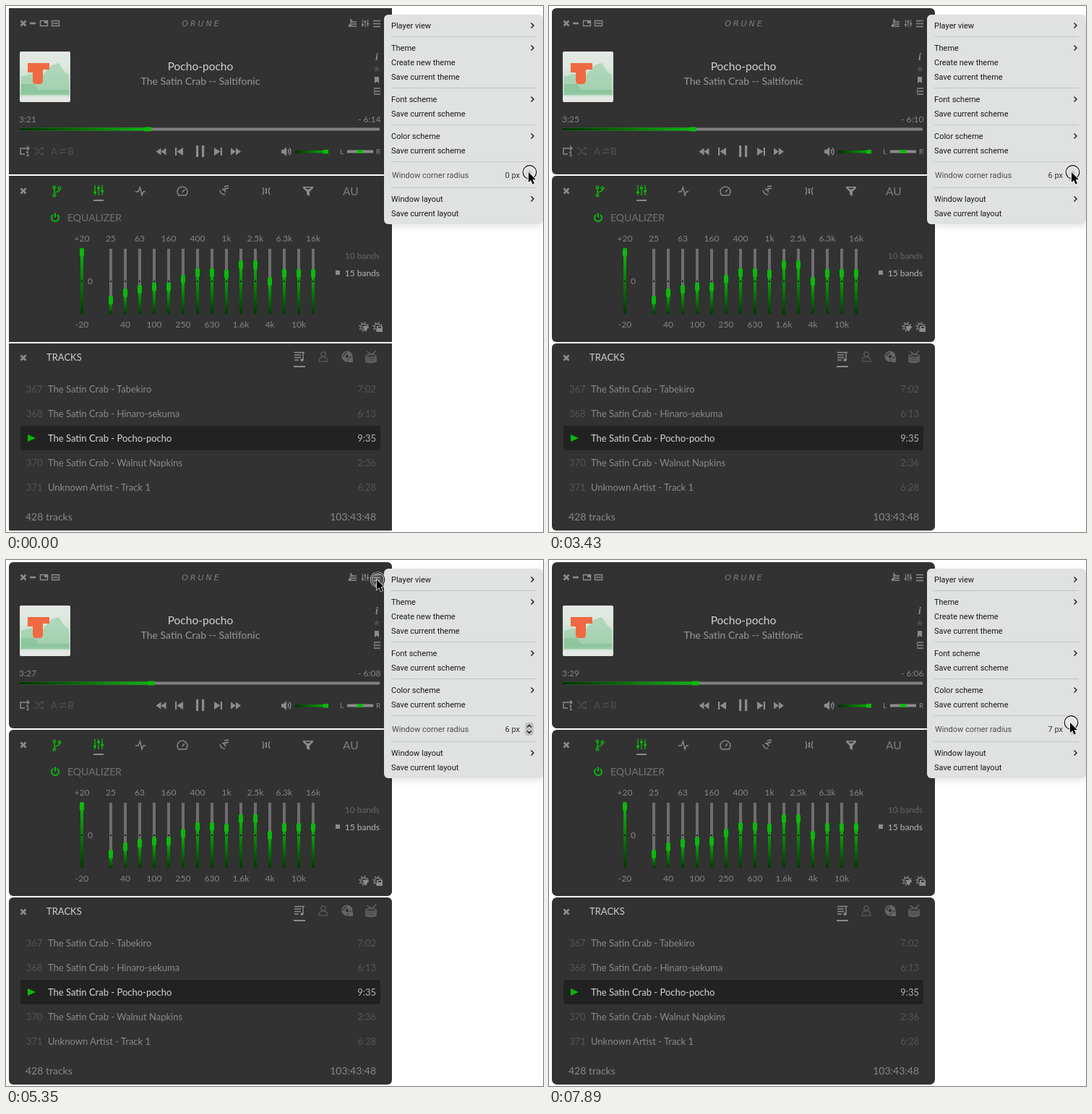
Recreate the animation shown at these times as an HTML page. Size 743 by 728 pixels, loop 8000 ms.

```html
<!DOCTYPE html>
<html lang="en">
<head>
<meta charset="utf-8">
<title>Music player</title>
<style>
html, body { margin: 0; width: 100%; height: 100%; overflow: hidden; background: #fff; }
svg { display: block; }
text { font: 12px Lato, sans-serif; fill: currentColor; }
path, circle, rect { fill: currentColor; }
.line, .line * { fill: none; stroke: currentColor; stroke-width: 1.4; }
.thick { stroke-width: 2.6; }
.mid { text-anchor: middle; }
.end { text-anchor: end; }
.icon { color: #8c8c8c; }
.dim { color: #4b4b4b; }
.green { color: #0bb80b; }
.big { font-size: 14px; }
.row { font-size: 13px; }
#menu { color: #161616; }
#menu text { font: 11px Roboto, sans-serif; }
#menu .card { fill: #e0e2e1; filter: drop-shadow(0 3px 5px rgba(0,0,0,.1)); }
</style>
</head>
<body>
<svg width="743" height="728" viewBox="0 0 743 728">
  <defs>
    <linearGradient id="across"><stop stop-color="#013001"/><stop offset="1" stop-color="#0bb80b"/></linearGradient>
    <linearGradient id="down" x2="0" y2="1"><stop stop-color="#0bb80b"/><stop offset="1" stop-color="#023a02"/></linearGradient>
    <linearGradient id="cover" x2="0" y2="1"><stop stop-color="#e4e8e4"/><stop offset=".3" stop-color="#dce8de"/><stop offset=".85" stop-color="#b5d8bd"/><stop offset=".9" stop-color="#e3e8e4"/></linearGradient>
    <path id="close" class="line thick" d="M20.500 20.500l7 7m0-7l-7 7"/>
    <g id="sliders" class="line"><path d="M-5-7V7M0-7V7M5-7V7"/><path class="thick" d="M-7 3h4M-2-3h4M3 1h4"/></g>
  </defs>

  <g color="#323232">
    <rect class="panel" x="4" y="3" width="530" height="230"/>
    <rect class="panel" x="4" y="235" width="530" height="230"/>
    <rect class="panel" x="4" y="467" width="530" height="259"/>
  </g>

  <!-- Player -->
  <g class="icon">
    <use href="#close"/>
    <path class="line thick" d="M33 24h8"/>
    <path class="line" d="M47.500 20.500h10v7h-10zM63.500 20.500h10v7h-10zM65 24h7"/>
    <path d="M53 20h5v4h-5z"/>
    <path class="line" d="M478 22h7M478 25h7M474 28h11M477 27v-8l2 2"/>
    <circle cx="475.500" cy="27" r="1.700"/>
    <path class="line" d="M508 20.500h10M508 24.500h10M508 28.500h10"/>
    <use href="#sliders" transform="translate(497 24) scale(.72)"/>
    <text x="513" y="75" class="mid" style="font:italic bold 14px 'Liberation Serif',serif">i</text>
    <path d="M510 98h6v9l-3-2.500-3 2.500z"/>
    <path class="line" d="M509 114h9M512 118h6M509 122h9M509 116l2 2-2 2"/>
    <path class="line" d="M20 201v-4h11M26 205h-6v-4M29 194l3 3-3 3"/>
    <text x="27" y="208" style="font-size:10px;font-weight:bold">1</text>
    <path d="M214.500 196.500v10l-7-5zM221.500 196.500v10l-7-5zM245 196v11l-8.500-5.500zM234 196h2.200v11H234zM263 193h3.200v16H263zM271 193h3.200v16H271zM288 196v11l8.500-5.500zM296.800 196h2.200v11h-2.200zM311 196.500v10l7-5zM318 196.500v10l7-5z"/>
    <path d="M381 199h3l4-4v13l-4-4h-3z"/>
    <path class="line" d="M390 198.500q2 3 0 6M392 196.500q4 5 0 10"/>
    <path d="M472 199.500h36v4h-36z"/>
    <text x="462" y="205" style="font-size:10px">L</text>
    <text x="512" y="205" style="font-size:10px">R</text>
  </g>
  <g class="dim">
    <path d="M513 82l1.300 3.300 3.700.2-2.800 2.300.9 3.600-3.100-2-3.100 2 .9-3.600-2.800-2.300 3.700-.2z"/>
    <path class="line" d="M39 197h3l6 8h4M39 205h3l6-8h4M50 195l2 2-2 2M50 203l2 2-2 2M74 199h8l-2-2M83 203h-8l2 2"/>
    <text x="62" y="206" class="row" style="font-weight:bold">A</text>
    <text x="85" y="206" class="row" style="font-weight:bold">B</text>
  </g>
  <text x="270.500" y="28" class="mid" color="#808080" style="font:italic 11px 'DejaVu Sans',sans-serif;letter-spacing:3px">ORUNE</text>
  <rect x="19" y="63" width="70" height="70" rx="2" style="fill:url(#cover)"/>
  <path d="M21 98l14-4 12 6 16-18 10-3 8 12 6 5v24H21z" color="#94cca3" opacity=".6"/>
  <path d="M21 108h18l6 8h42v7H21z" color="#7fbf92" opacity=".6"/>
  <path d="M30 79h30v9h-9v15q0 5-5 5h-5q-4 0-4-5V92h-7z" color="#ef6a42"/>
  <text x="269" y="89" class="mid" color="#d2d2d2" style="font-size:15.500px">Pocho-pocho</text>
  <text x="269" y="109" class="mid big" color="#999">The Satin Crab -- Saltifonic</text>
  <text id="elapsed" x="18" y="161" color="#888"></text>
  <text id="remaining" x="518.500" y="161" class="end" color="#888"></text>
  <rect x="19" y="168.500" width="498" height="4" color="#808080"/>
  <rect id="played" x="19" y="168.500" height="4" style="fill:url(#across)"/>
  <rect id="knob" class="green" y="167.500" width="10" height="6" rx="1"/>
  <rect x="400" y="200" width="46" height="3.500" style="fill:url(#across)"/>
  <path class="green" d="M439 199h7v5.500h-7zM486 199h8v5h-8z"/>

  <!-- Effects -->
  <g class="icon">
    <use href="#close" y="232"/>
    <path d="M121 268h14v2h-14z"/>
    <path class="line" d="M179 257h4l2.500-6 2.500 11 2-5h3M239 262a7 7 0 1 1 10 0zM244 258l3-4M296 255q1 6 7 6M299 253q6 3 4 5M301 255l3-3M302 250q4-1 6-1M304 254q1-2 4-2M355 251q3 5 0 10M359 252.500q2 3.500 0 7M361 252.500q-2 3.500 0 7M365 251q-3 5 0 10"/>
    <path d="M411 250h14v2l-5 5v6l-4-2v-4l-5-5z"/>
    <path d="M414 251.500h8l-2 2h-4z" color="#323232"/>
    <text x="466" y="262" color="#7d7d7d" style="font-size:15.500px">AU</text>
    <path d="M456 366h6v6h-6z"/>
  </g>
  <g class="green">
    <use href="#sliders" transform="translate(128 255)"/>
    <g class="line"><circle cx="67" cy="251" r="1.800"/><circle cx="74" cy="252" r="1.800"/><circle cx="67" cy="262" r="1.800"/><path d="M67 253v7M74 254q0 3-7 4"/></g>
    <path class="line" d="M65 289a5 5 0 1 0 6 0M68 286.500v6" style="stroke-width:2"/>
  </g>
  <text x="85" y="298" class="big" color="#737373">EQUALIZER</text>
  <g id="bands" color="#858585"><text x="113" y="385">0</text></g>
  <text x="517" y="350" class="end" color="#666">10 bands</text>
  <text x="517" y="374" class="end" color="#b4b4b4">15 bands</text>
  <g class="icon">
    <g class="line"><circle cx="495" cy="444" r="4"/><circle cx="514" cy="444" r="4"/></g>
    <g class="line" stroke-dasharray="2 2.700"><circle cx="495" cy="444" r="6"/><circle cx="514" cy="444" r="6"/></g>
    <path d="M493 443h9l-4.500 8zM513 443h8v8h-8z"/>
    <path d="M515 444h4v2h-4z" color="#323232"/>
  </g>

  <!-- Playlist -->
  <g class="icon">
    <use href="#close" y="463"/>
    <path class="line" d="M399 479.500h14M399 483h9M399 486.500h9M399 490h6M411 490v-11"/>
    <circle cx="409.500" cy="490" r="2"/>
    <path d="M398 498h16v2h-16z"/>
  </g>
  <g color="#666">
    <g class="line" color="#555"><circle cx="439" cy="482" r="3.200"/><path d="M433 492q0-5 4-6h4q4 1 4 6z"/></g>
    <circle cx="472" cy="485" r="7.500"/>
    <circle cx="472" cy="485" r="2.300" color="#323232"/>
    <path class="line" d="M467 485a5 5 0 0 1 5-5M477 485a5 5 0 0 1-5 5" color="#323232"/>
    <path d="M474 488l6-1v6h-6z"/>
    <path d="M498 485h14v7q-7 3-14 0z" color="#555"/>
    <path class="line" d="M498 484q7-4 14 0v8q-7 3-14 0zM499 478l7 4M512 477l-6 6"/>
  </g>
  <text x="56" y="491" class="row" color="#d0d0d0">TRACKS</text>
  <rect x="20" y="581" width="498" height="34" rx="3" color="#222"/>
  <path class="green" d="M30 593l11 5-11 5z"/>
  <g id="tracks"></g>
  <text x="27" y="712" class="big" color="#888">428 tracks</text>
  <text x="512" y="712" class="big end" color="#888">103:43:48</text>

  <!-- Menu -->
  <g id="menu">
    <rect class="card" x="523" y="12" width="220" height="290" rx="6"/>
    <path d="M533 42h200v1H533zM533 113h200v1H533zM533 164h200v1H533zM533 215h200v1H533zM533 251h200v1H533z" color="#c2c4c3"/>
    <text x="534" y="238" color="#4a4a4a">Window corner radius</text>
    <text id="radius" x="711" y="238" class="end" color="#333"></text>
    <g id="stepper">
      <rect x="718" y="225" width="12" height="18" rx="4" color="#bfc1c0"/>
      <path class="line" d="M721 231.500l3-3 3 3M721 236.500l3 3 3-3"/>
    </g>
  </g>

  <g id="pointer">
    <g id="ring"><circle cx="1.500" r="9.300" style="fill:rgba(255,255,255,.15);stroke:#fff;stroke-width:2.600"/><circle cx="1.500" r="9.300" style="fill:none;stroke:#000;stroke-width:1.200"/></g>
    <path d="M0 0v14l3.200-3 2.400 5.400 2.300-1-2.300-5.200H10z" style="fill:#000;stroke:#fff;stroke-width:1.400;paint-order:stroke"/>
  </g>
</svg>

<script>
const LOOP = 8000, STEP = 148.8, TRACK_LENGTH = 575;
const $ = id => document.getElementById(id);
const add = (id, markup) => $(id).insertAdjacentHTML('beforeend', markup);
const clock = s => `${Math.floor(s / 60)}:${String(s % 60).padStart(2, '0')}`;

function addSlider(x, y) {
  add('bands', `<rect x="${x - 2}" y="336" width="4" height="90" color="#6e6e6e"/>
    <rect x="${x - 2}" y="${y}" width="4" height="${426 - y}" style="fill:url(#down)"/>
    <rect x="${x - 1}" y="380" width="2" height="2" color="#151515"/>
    <rect class="green" x="${x - 3}" y="${y - 6}" width="6" height="12" rx="2"/>`);
}
const addLabel = (x, y, label) => add('bands', `<text class="mid" x="${x}" y="${y}">${label}</text>`);

addSlider(105, 341);
[407, 397, 392, 389, 389, 378, 369, 369, 371, 358, 358, 381, 370, 370, 370]
  .forEach((y, i) => addSlider(145 + 20 * i, y));
addLabel(105, 326, '+20');
addLabel(105, 445, '-20');
'25 40 63 100 160 250 400 630 1k 1.6k 2.5k 4k 6.3k 10k 16k'.split(' ')
  .forEach((label, i) => addLabel(145 + 20 * i, i % 2 ? 445 : 326, label));

const BAND = 'The Satin Crab - ';
[[BAND + 'Tabekiro', '7:02'], [BAND + 'Hinaro-sekuma', '6:13'], [BAND + 'Pocho-pocho', '9:35'],
 [BAND + 'Walnut Napkins', '2:36'], ['Unknown Artist - Track 1', '6:28']].forEach(([name, length], i) => {
  const y = 535 + 34 * i, playing = i === 2;
  if (!playing) add('tracks', `<text class="row" x="28" y="${y}" color="#555">${367 + i}</text>`);
  add('tracks', `<text class="row" x="58" y="${y}" color="${playing ? '#d6d6d6' : '#8a8a8a'}">${name}</text>
    <text class="row end" x="512" y="${y}" color="${playing ? '#b4b4b4' : '#555'}">${length}</text>`);
});

[[27, 'Player view', 1], [58, 'Theme', 1], [78, 'Create new theme'], [98, 'Save current theme'],
 [129, 'Font scheme', 1], [149, 'Save current scheme'], [180, 'Color scheme', 1],
 [200, 'Save current scheme'], [267, 'Window layout', 1], [287, 'Save current layout']].forEach(([y, label, nested]) => {
  add('menu', `<text x="533" y="${y + 4}">${label}</text>`);
  if (nested) add('menu', `<path class="line" d="M726.500 ${y - 3.5}l3.500 3.500-3.500 3.500"/>`);
});

// Times below are counted in screen updates of STEP ms.
const radiusChanges = [12, 15, 17, 19, 21, 23, 48];
const presses = [[0, 1], [12, 13], [15, 16], [17, 20], [21, 22], [23, 24], [36, 37], [48, 54]];
const pointerPath = [[0, 723, 230], [25, 723, 230], [34, 513, 27], [38, 513, 27], [43, 702, 226], [46, 721, 225], [54, 721, 225]];

function pointerAt(step) {
  const i = pointerPath.findIndex(([at]) => at > step);
  const [t0, x0, y0] = pointerPath[i - 1], [t1, x1, y1] = pointerPath[i];
  const p = (step - t0) / (t1 - t0), ease = p * p * (3 - 2 * p);
  return [x0 + (x1 - x0) * ease, y0 + (y1 - y0) * ease];
}

function draw(time) {
  const step = Math.min(53, Math.floor((time + 8) / STEP));
  const seconds = 201 + Math.floor((step + 4) / 6.65);
  const radius = radiusChanges.filter(at => at <= step).length;
  const pressed = presses.some(([from, to]) => step >= from && step < to);
  const menuOpen = step < 24 || step >= 36;
  const knobX = 191.2 + Math.floor(step / 3) * 0.39;
  const [x, y] = pointerAt(step);

  $('elapsed').textContent = clock(seconds);
  $('remaining').textContent = '- ' + clock(TRACK_LENGTH - seconds);
  $('played').setAttribute('width', knobX - 14);
  $('knob').setAttribute('x', knobX);
  document.querySelectorAll('.panel').forEach(panel => panel.setAttribute('rx', radius));
  $('radius').textContent = radius + ' px';
  $('menu').style.display = menuOpen ? '' : 'none';
  $('ring').style.display = pressed ? '' : 'none';
  $('stepper').style.opacity = pressed && x > 700 ? 0.25 : 1;
  $('pointer').setAttribute('transform', `translate(${x} ${y})`);
}

function tick() {
  draw(performance.now() % LOOP);
  requestAnimationFrame(tick);
}
tick();
</script>
</body>
</html>
```
